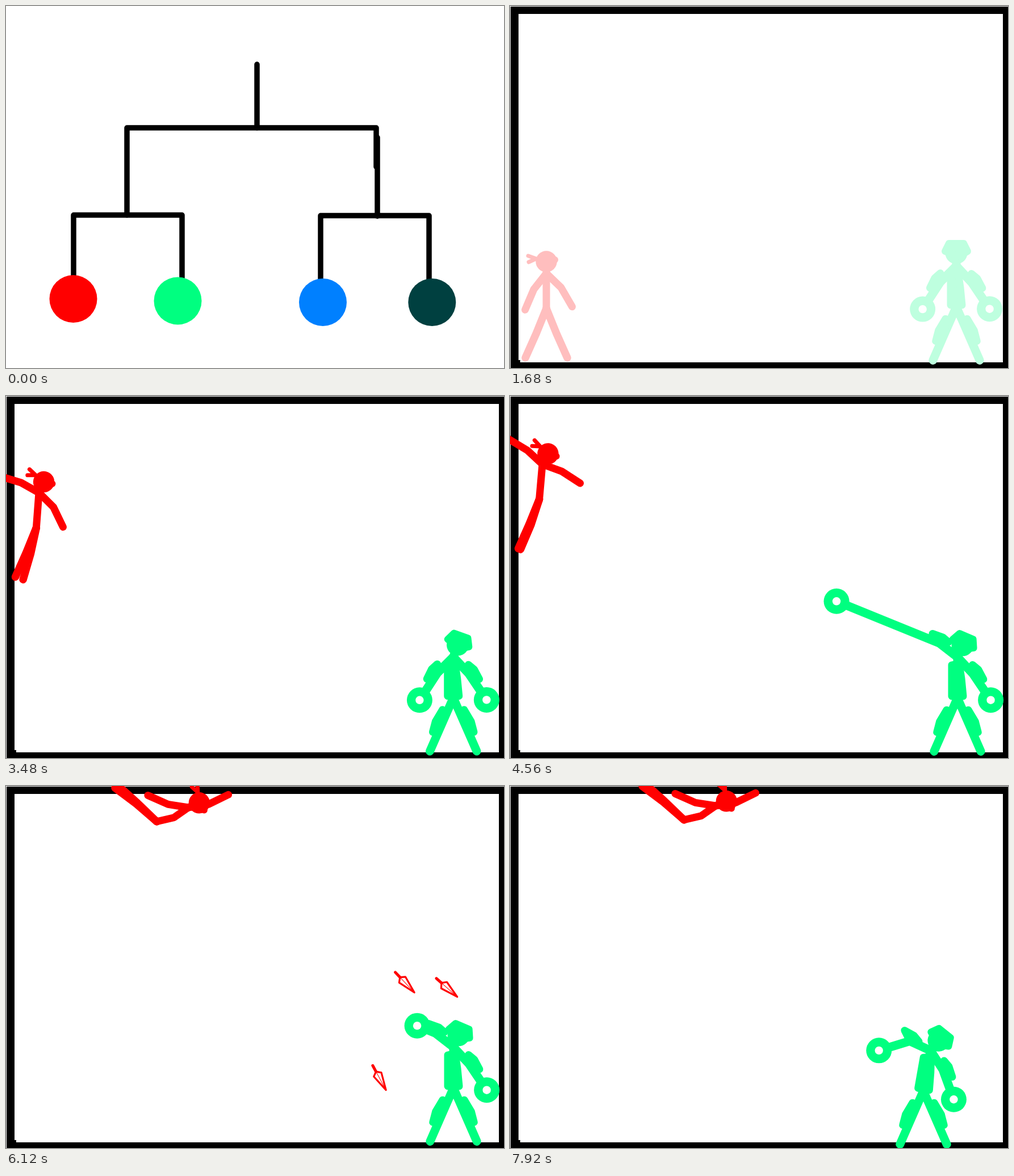
Write an HTML page with a canvas that moves like this. It is 877 by 639 pixels and loops after 8000 ms.

```html
<!DOCTYPE html>
<html>
<head>
<meta charset="utf-8">
<style>
  html, body { margin: 0; height: 100%; overflow: hidden; background: #fff; }
  canvas { display: block; }
</style>
</head>
<body>
<canvas id="stage" width="877" height="639"></canvas>
<script>
const ctx = document.getElementById('stage').getContext('2d');
const LOOP = 8000, STEP = 120, RAD = Math.PI / 180;
const RED = [255, 0, 0], GREEN = [0, 255, 128];

// Poses are joint angles in degrees: 0 points right, 90 points down.
const redStand = {
  neck: [64, 472], head: [-90], spine: [90, 90],
  armL: [128, 113], armR: [44, 60], legL: [112, 114], legR: [68, 66]
};
const redWall = {
  neck: [57, 120.5], head: [-62], spine: [95, 95],
  armL: [223, 211], armR: [20, 33], legL: [112, 114], legR: [108, 113]
};
const redCeiling = {
  neck: [321, 38], head: [-23], spine: [145, 167],
  armL: [189, 204], armR: [-9, -26], legL: [221, 217], legR: [224, 222]
};
const greenHang = {
  hip: [788, 533], head: [-67], spine: [-90],
  armL: [135, 123], reach: [57], guardL: [125], armR: [47, 56]
};
const greenStand = { ...greenHang, hip: [786, 531], head: [-90] };
const greenAim = { ...greenHang, armL: [218, 202.2], reach: [35], guardL: [208] };
const greenPunch = { ...greenAim, reach: [793] };
const greenBlock = { ...greenHang, armL: [191, 248], guardL: [206] };
const greenCrouch = {
  ...greenHang, head: [-51], spine: [-80],
  armL: [205, 163], guardL: [218], armR: [57, 70]
};

const redTrack = [
  [2760, redStand],
  [3600, { ...redWall, armR: [45, 65] }],
  [4440, redWall], [4560, redWall],
  [5280, redCeiling],
  [5400, { ...redCeiling, armR: [-11, -31] }],
  [5640, { ...redCeiling, armR: [10, 25] }],
  [6120, redCeiling],
  [6960, { ...redCeiling, armR: [-6, -41] }],
  [7800, { ...redCeiling, armR: [-6, -41] }],
  [7920, { ...redCeiling, neck: [362, 35] }]
];
const greenTrack = [
  [2760, greenStand], [3600, greenHang], [4440, greenAim],
  [4560, { ...greenAim, reach: [196] }], [5040, greenPunch], [5400, greenPunch],
  [6120, greenAim], [6960, greenBlock], [7800, greenCrouch],
  [7920, { ...greenCrouch, hip: [728, 538] }]
];

function poseAt(track, t) {
  const next = track.findIndex(([time]) => time > t);
  if (next === 0) return track[0][1];
  if (next < 0) return track[track.length - 1][1];
  const [t0, a] = track[next - 1], [t1, b] = track[next];
  const k = (t - t0) / (t1 - t0), pose = {};
  for (const part in a) pose[part] = a[part].map((v, i) => v + (b[part][i] - v) * k);
  return pose;
}

// Joints of a limb: the start point, then one point per bone.
function chain(start, angles, lengths) {
  const joints = [start];
  angles.forEach((angle, i) => {
    const [x, y] = joints[i], a = angle * RAD;
    joints.push([x + lengths[i] * Math.cos(a), y + lengths[i] * Math.sin(a)]);
  });
  return joints;
}

function line(points, width, closed) {
  ctx.beginPath();
  for (const [x, y] of points) ctx.lineTo(x, y);
  if (closed) {
    ctx.closePath();
    ctx.fill();
  }
  ctx.lineWidth = width;
  ctx.stroke();
}
const plate = (points, width) => line(points, width, true);

function disc(x, y, r) {
  ctx.beginPath();
  ctx.arc(x, y, r, 0, 2 * Math.PI);
  ctx.fill();
}
function ink(color) {
  ctx.fillStyle = ctx.strokeStyle = color;
}
function inFrame([x, y], angle, paint) {
  ctx.save();
  ctx.translate(x, y);
  ctx.rotate(angle * RAD);
  paint();
  ctx.restore();
}
const tint = (rgb, k) => `rgb(${rgb.map(v => Math.round(255 + (v - 255) * k))})`;

function drawRed(p, color) {
  ink(color);
  const spine = chain(p.neck, p.spine, [31, 31]);
  const head = chain(p.neck, p.head, [21])[1];
  line([head, ...spine], 13);
  for (const arm of [p.armL, p.armR]) line(chain(p.neck, arm, [36, 39]), 13);
  for (const leg of [p.legL, p.legR]) line(chain(spine[2], leg, [47.5, 47]), 13.5);
  inFrame(head, p.head[0] + 90, () => {
    disc(0, 0, 18.7);
    disc(15, -3, 6);
    line([[-32, -10], [-18, -5], [-31, 1]], 7);
  });
}

// Armour plate on the outside of an elbow or knee.
function drawGuard(joint, angle, side, length) {
  inFrame(joint, angle, () => {
    plate([[-length, 9 * side], [0, 12 * side], [19, 9 * side], [0, 0]], 13);
  });
}

function drawGreenArm(neck, angles, reach, guardAngle, side, color) {
  const [, elbow, hand] = chain(neck, angles, [40, reach]);
  line([neck, elbow, hand], 15.5);
  drawGuard(elbow, guardAngle, side, 13);
  disc(...hand, 22.5);
  ctx.fillStyle = '#fff';
  disc(...hand, 7.2);
  ctx.fillStyle = color;
}

function drawGreen(p, color) {
  ink(color);
  const neck = chain(p.hip, p.spine, [72])[1];
  const head = chain(neck, p.head, [23])[1];
  for (const side of [1, -1]) {
    const angle = 90 + 23.6 * side;
    const [, knee, foot] = chain(p.hip, [angle, angle], [51, 52]);
    line([p.hip, foot], 15);
    drawGuard(knee, angle, side, 24);
  }
  line([head, neck, p.hip], 15);
  inFrame(neck, p.spine[0] + 180, () => {
    plate([[14, 10], [11, -3], [38, -7], [69, -10], [69, 10]], 13);
  });
  drawGreenArm(neck, p.armL, p.reach[0], p.guardL[0], 1, color);
  drawGreenArm(neck, p.armR, 56, p.armR[0] + 6, -1, color);
  inFrame(head, p.head[0] + 90, () => {
    disc(0, 0, 19.5);
    plate([[-20, -3], [-13, -17], [13, -17], [20, -3], [5, 6]], 12);
  });
}

function drawKnives(t) {
  const k = Math.min(1, (t - 5450) / 790);
  ctx.strokeStyle = '#f00';
  ctx.fillStyle = '#fff';
  for (const [x, y] of [[779, 428], [868, 437], [720, 631]]) {
    const dx = x - 385, dy = y - 10;
    inFrame([385 + dx * k, 10 + dy * k], Math.atan2(dy, dx) / RAD, () => {
      line([[-49, 0], [-37, 0]], 5);
      plate([[-37, 0], [-31, 7.5], [0, 0], [-31, -7.5]], 3.2);
      line([[-37, 0], [0, 0]], 1);
    });
  }
}

function drawFork(left, right, top, bottomLeft, bottomRight) {
  line([[left, bottomLeft], [left, top], [right, top], [right, bottomRight]], 9.5);
}

function drawBracket(t) {
  const rise = 46 * Math.max(0, Math.min(3, (t - 240) / STEP));
  ink('#000');
  line([[442, 103], [442, 215]], 9.5);
  line([[654, 232], [654, 371]], 9.5);
  drawFork(213, 652, 215, 369, 284);
  drawFork(119, 310, 369, 480, 480);
  drawFork(554, 745, 370, 485, 485);
  for (const [x, y, color] of [
    [118.5, 517 - rise, '#f00'], [302.5, 520.5 - rise, '#00ff80'],
    [558, 523, '#0080ff'], [750.3, 523, '#004040']
  ]) {
    ink(color);
    disc(x, y, 42);
  }
}

function drawArena() {
  ctx.fillStyle = '#000';
  ctx.fillRect(1, 1, 876, 638);
  ctx.fillStyle = '#fff';
  ctx.fillRect(15, 14, 853, 615);
  ctx.fillStyle = '#000';
  ctx.fillRect(14, 625, 4, 5);
}

function draw(t) {
  ctx.fillStyle = '#fff';
  ctx.fillRect(0, 0, 877, 639);
  if (t < 840) return drawBracket(t);
  drawArena();
  const strength = t < 2880 ? 0.12 + 0.32 * (Math.min(t, 2640) - 1080) / 1440 : 1;
  drawGreen(poseAt(greenTrack, t), tint(GREEN, strength));
  drawRed(poseAt(redTrack, t), tint(RED, strength));
  if (t >= 5520 && t < 7440) drawKnives(t);
}

ctx.lineCap = ctx.lineJoin = 'round';
const start = performance.now();
function tick() {
  const t = (performance.now() - start) % LOOP;
  draw(Math.floor(t / STEP) * STEP);
  requestAnimationFrame(tick);
}
tick();
</script>
</body>
</html>
```
